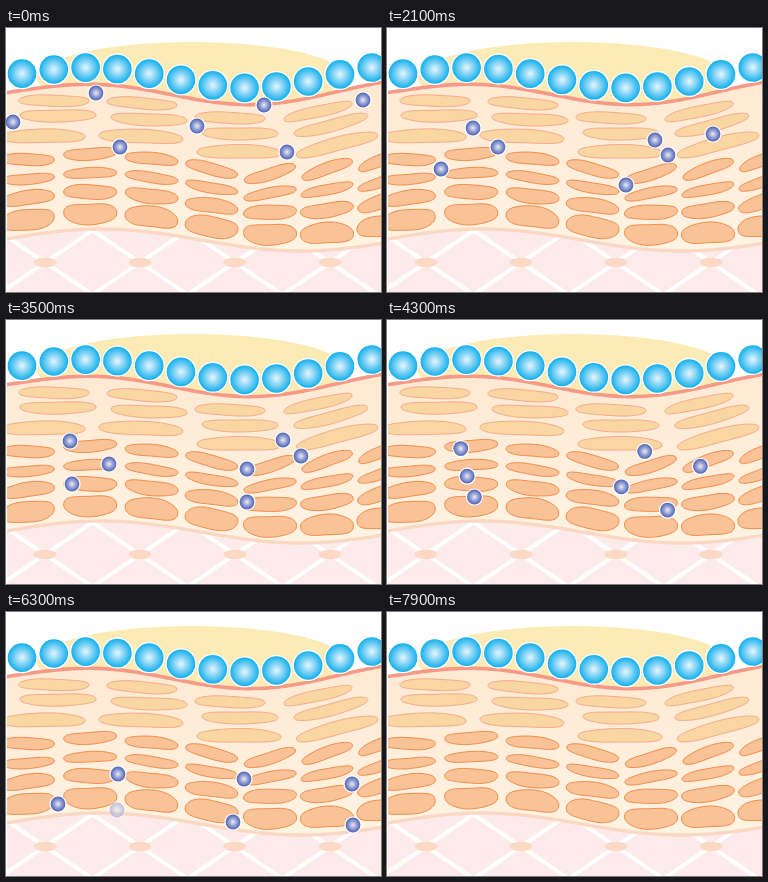
These frames come from a looping animation (375x264 px, 8000 ms). An HTML page with a canvas:

```html
<!DOCTYPE html>
<html lang="en">
<head>
<meta charset="utf-8">
<title>Particles sinking through skin layers</title>
<style>
html, body { margin: 0; width: 100%; height: 100%; overflow: hidden; background: #fff; }
canvas { display: block; }
</style>
</head>
<body>
<canvas id="stage" width="375" height="264"></canvas>
<script>
const W = 375, H = 264, LOOP = 8000, STEP = 100, TAU = Math.PI * 2;
const stage = document.getElementById('stage').getContext('2d');

const mix = (a, b, f) => a + (b - a) * f;
const clamp = (v, lo, hi) => Math.max(lo, Math.min(hi, v));

// Upper and lower border of the skin; cells lie at a depth between them
const surface = x => 67.4 - 9.7 * Math.cos((x - 90) / 50.3) - 0.00014 * (x - 187) ** 2;
const membrane = x => 212 - 11 * Math.cos((x - 95) / 63.7);
const layer = (x, depth) => mix(surface(x), membrane(x), depth);

const upperRows = [
  { depth: 0.1, x: 48, gap: 88, a: 35, b: 6 },
  { depth: 0.205, x: 52, gap: 91, a: 38, b: 6.4 },
  { depth: 0.335, x: 37, gap: 98, a: 42, b: 7.2 }
];
const upperTilt = [0, 3, 1, -14];
const lowerRows = [
  { depth: 0.48, b: 6.3 }, { depth: 0.613, b: 5.5 },
  { depth: 0.743, b: 7.6 }, { depth: 0.893, b: 11 }
];
// Tilt of each lower column, at its first and last row
const tiltFirst = [0, -3, 6, 13, -16, -19, -24];
const tiltLast = [-10, 1, 9, 6, 2, -1, -11];

// Each particle passes its points at these times (tenths of a second)
const times = [0, 8, 21, 35, 52, 63, 79];
const particles = [
  { path: [[90, 65], [101, 77], [86, 100], [64, 121], [92, 138], [112, 162], [52, 180]] },
  { path: [[7, 94], [61, 102], [111, 119], [103, 144], [54, 170], [52, 192], [52, 206]], end: 72 },
  { path: [[114, 119], [71, 122], [54, 141], [66, 164], [111, 190], [111, 198], [111, 206]], end: 66 },
  { path: [[191, 98], [229, 106], [268, 112], [295, 136], [333, 157], [346, 172], [299, 198]] },
  { path: [[258, 77], [277, 99], [281, 127], [241, 149], [232, 188], [227, 210], [226, 224]], end: 72 },
  { path: [[357, 72], [365, 86], [326, 106], [277, 120], [242, 146], [238, 167], [173, 191]] },
  { path: [[281, 124], [253, 135], [239, 157], [241, 182], [330, 198], [347, 213], [347, 225]], end: 74 }
];

function traceLine(c, height) {
  c.beginPath();
  for (let x = -6; x <= W + 6; x += 3) c.lineTo(x, height(x));
}

function strokeLine(c, height, color, width) {
  traceLine(c, height);
  c.strokeStyle = color;
  c.lineWidth = width;
  c.stroke();
}

function fillBelow(c, height, fill) {
  traceLine(c, height);
  c.lineTo(W + 6, H + 2);
  c.lineTo(-6, H + 2);
  c.closePath();
  c.fillStyle = fill;
  c.fill();
}

function fillEllipse(c, x, y, a, b, fill) {
  c.beginPath();
  c.ellipse(x, y, a, b, 0, 0, TAU);
  c.fillStyle = fill;
  c.fill();
}

// Rounded bar with a slight bend
function drawCell(c, x, y, a, b, tilt, seed, fill, line) {
  const round = v => Math.sign(v) * Math.abs(v) ** 0.83;
  c.save();
  c.translate(x, y);
  c.rotate(tilt * Math.PI / 180);
  c.beginPath();
  for (let k = 0; k < 48; k++) {
    const q = k / 48 * TAU;
    const u = round(Math.cos(q));
    c.lineTo(a * u, b * (0.94 * round(Math.sin(q)) + 0.1 * Math.sin(u * 3 + seed * 2.1)));
  }
  c.closePath();
  c.restore();
  c.fillStyle = fill;
  c.fill();
  c.strokeStyle = line;
  c.lineWidth = 1;
  c.stroke();
}

function drawBall(c, x, y, r, ring, stops) {
  const g = c.createRadialGradient(x, y, 0, x, y, r);
  stops.forEach((s, i) => g.addColorStop(i / (stops.length - 1), s));
  fillEllipse(c, x, y, r + ring, r + ring, '#fff');
  fillEllipse(c, x, y, r, r, g);
}

function drawTissue(c) {
  c.save();
  fillBelow(c, membrane, '#fdebeb');
  c.clip();
  c.strokeStyle = '#fff';
  c.lineWidth = 4;
  for (let x = 39; x < W; x += 95) {
    for (const side of [-48, 48]) {
      c.beginPath();
      c.moveTo(x - side, 202);
      c.lineTo(x + side, 267);
      c.stroke();
    }
    fillEllipse(c, x, 234.5, 11.5, 4.8, '#fbd9c5');
  }
  c.restore();
  strokeLine(c, membrane, '#fbd8c4', 3.4);
}

function drawCells(c) {
  upperRows.forEach(({ depth, x, gap, a, b }, row) => upperTilt.forEach((tilt, col) => {
    const cx = x + gap * col;
    drawCell(c, cx, layer(cx, depth), a, b, tilt, row + col * 3, '#fad6a2', '#f5ab8c');
  }));
  lowerRows.forEach(({ depth, b }, row) => tiltFirst.forEach((tilt, col) => {
    const cx = 22 + 59.2 * col + 6 * Math.sin(col * Math.PI / 6);
    drawCell(c, cx, layer(cx, depth), 26.5, b, mix(tilt, tiltLast[col], row / 3),
      row + col * 4, '#f9c297', '#f18d4c');
  }));
}

function drawScene(c) {
  c.fillStyle = '#fff';
  c.fillRect(0, 0, W, H);
  c.beginPath();
  c.rect(1, 0, W - 1, H);
  c.clip();

  fillEllipse(c, 186, 50, 155, 36, '#fdebb5');
  const skin = c.createLinearGradient(0, 57, 0, 215);
  skin.addColorStop(0, '#ffe9d3');
  skin.addColorStop(1, '#fff3e2');
  fillBelow(c, surface, skin);
  strokeLine(c, surface, '#f59a87', 3.6);
  drawTissue(c);
  drawCells(c);
  for (let x = 16; x < W; x += 31.8)
    drawBall(c, x, surface(x) - 16.7, 14.3, 1.3, ['#e6f6fd', '#7fd2f6', '#14b0ea']);
}

// Smooth motion through the path points
function position(path, t) {
  const last = times.length - 1;
  const i = clamp(times.findIndex(k => k > t) - 1, 0, last - 1);
  const span = times[i + 1] - times[i];
  const f = (t - times[i]) / span;
  return [0, 1].map(axis => {
    const slope = k => {
      const [lo, hi] = [Math.max(k - 1, 0), Math.min(k + 1, last)];
      return (path[hi][axis] - path[lo][axis]) / (times[hi] - times[lo]) * span;
    };
    const ease = f * f * (3 - 2 * f);
    return mix(path[i][axis], path[i + 1][axis], ease)
      + slope(i) * f * (1 - f) ** 2 - slope(i + 1) * f * f * (1 - f);
  });
}

const scene = document.createElement('canvas');
scene.width = W;
scene.height = H;
drawScene(scene.getContext('2d'));

const start = performance.now();
function frame() {
  const t = Math.floor((performance.now() - start) % LOOP / STEP);
  stage.drawImage(scene, 0, 0);
  for (const { path, end = Infinity } of particles) {
    stage.globalAlpha = clamp((end - t) / 8, 0, 1);
    drawBall(stage, ...position(path, t), 7.4, 1.2, ['#e9ebf6', '#98a3d5', '#5164b2']);
  }
  stage.globalAlpha = 1;
  requestAnimationFrame(frame);
}
frame();
</script>
</body>
</html>
```
